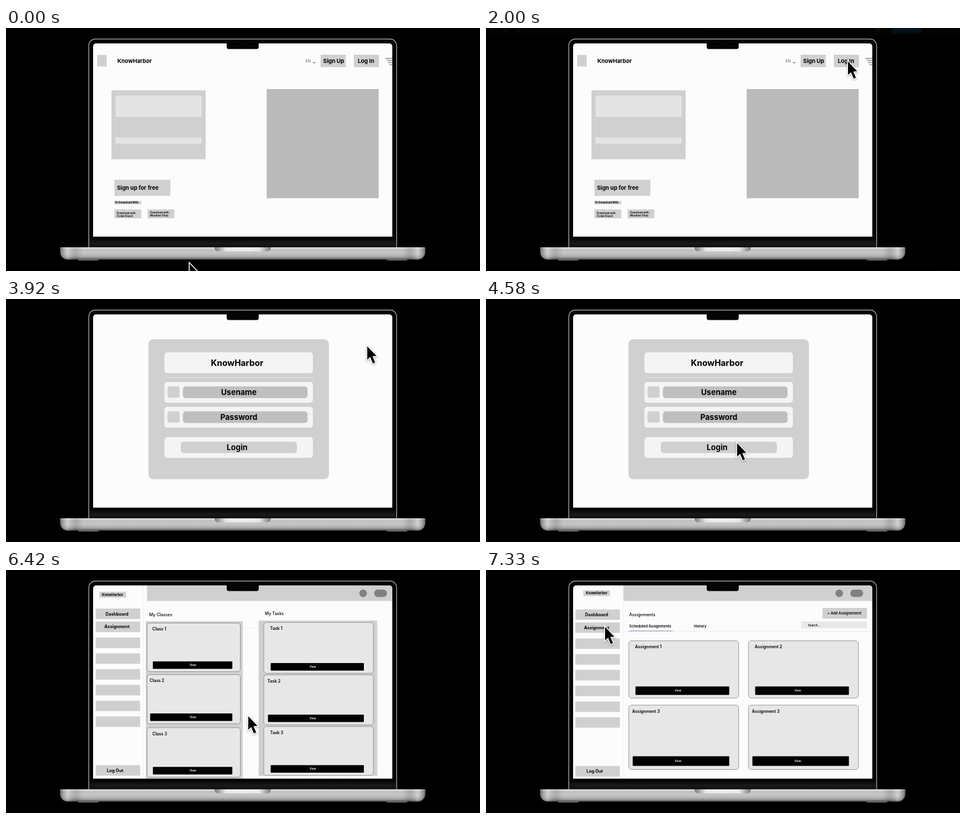
Animation of 800x410 px, one loop 8000 ms. Source, as an HTML page with a canvas:

```html
<!DOCTYPE html>
<html lang="en">
<head>
<meta charset="utf-8">
<title>Laptop prototype walkthrough</title>
<style>
  html, body { margin: 0; width: 100%; height: 100%; overflow: hidden; background: #000; }
  canvas { display: block; width: 800px; height: 410px; }
</style>
</head>
<body>
<canvas id="stage"></canvas>
<script>
const canvas = document.getElementById('stage');
const ctx = canvas.getContext('2d');
const dpr = window.devicePixelRatio || 1;
canvas.width = 800 * dpr;
canvas.height = 410 * dpr;

const LOOP = 8000, FPS = 12, TICKS = LOOP * FPS / 1000;
const BRAND = 'KnowHarbor';
const GREY = '#d0d0d0', PAPER = '#fcfcfc', PALE = '#d8d8d8';
const SCREEN = { x: 147, y: 26, w: 505, h: 326 };

function box(x, y, w, h, fill, r = 0, stroke, width = 1) {
  ctx.beginPath();
  ctx.roundRect(x, y, w, h, r);
  if (fill) { ctx.fillStyle = fill; ctx.fill(); }
  if (stroke) { ctx.strokeStyle = stroke; ctx.lineWidth = width; ctx.stroke(); }
}

function disc(x, y, r, fill) {
  ctx.beginPath();
  ctx.arc(x, y, r, 0, Math.PI * 2);
  ctx.fillStyle = fill;
  ctx.fill();
}

function line(points, color, width = 1) {
  ctx.beginPath();
  points.forEach(([x, y]) => ctx.lineTo(x, y));
  ctx.strokeStyle = color;
  ctx.lineWidth = width;
  ctx.stroke();
}

const rule = (x0, x1, y, color, width) => line([[x0, y], [x1, y]], color, width);

function text(str, x, y, size, weight = 700, color = '#000', align = 'left') {
  ctx.font = `${weight} ${size}px Inter, sans-serif`;
  ctx.fillStyle = color;
  ctx.textAlign = align;
  ctx.fillText(str, x, y);
}

// Text centred on a point, using the cap height.
function label(str, x, y, size, weight, color) {
  text(str, x, y + size * 0.364, size, weight, color, 'center');
}

function chevron(x, y, color, s = 1.5, width = 0.8) {
  line([[x - s, y - s / 2], [x, y + s / 2], [x + s, y - s / 2]], color, width);
}

// Evenly spaced colours along a line.
function gradient(x0, y0, x1, y1, ...colors) {
  const g = ctx.createLinearGradient(x0, y0, x1, y1);
  colors.forEach((c, i) => g.addColorStop(i / (colors.length - 1), c));
  return g;
}

function drawLaptop() {
  box(139.7, 18.7, 519.6, 357, '#030303', [11, 11, 0, 0], '#b4b4b4', 1.2);
  box(141, 357, 517, 13, gradient(0, 357, 0, 370, '#0a0a0a', '#191919', '#101010'));

  for (const x of [121, 642]) box(x, 388, 36, 4.3, '#777', [0, 0, 3, 3]);
  const corners = [1, 1, 13, 13];
  const metal = gradient(0, 370, 0, 391, '#e2e2e2', '#c0c0c0', '#c6c6c6', '#bcbcbc', '#a0a0a0', '#4c4c4c');
  box(91.5, 370, 616, 20.8, metal, corners);
  for (const [edge, inner] of [[91.5, 131], [707.5, 668]]) {
    const shade = gradient(edge, 0, inner, 0, 'rgba(0,0,0,.45)', 'rgba(255,255,255,.2)', 'rgba(0,0,0,.12)', 'rgba(0,0,0,0)');
    box(Math.min(edge, inner), 370, 39.5, 20.8, shade, corners);
  }
  box(352, 370, 95, 6.8, gradient(352, 0, 447, 0, '#777', '#e6e6e6', '#ededed', '#ededed', '#e6e6e6', '#777'), [0, 0, 6, 6]);
}

function drawNotch() {
  box(372.5, 20, 54, 15.5, '#030303', [0, 0, 3.5, 3.5]);
  disc(400, 28, 1.3, '#15151c');
}

function drawHome() {
  box(154, 45.5, 16, 19.5, GREY);
  text(BRAND, 188, 59, 9.4);
  text('EN', 506, 58, 5.8, 400, '#555');
  chevron(520, 58.3, '#222', 2, 1);
  ['Sign Up', 'Log In'].forEach((str, i) => {
    box(531 + 56 * i, 45, 42.5, 21, GREY);
    text(str, 535.3 + 58.5 * i, 58.7, 9.4);
  });
  for (let i = 0; i < 4; i++) rule(640.3 + i * 2.3, 652, 51.3 + i * 3.5, '#777', 1.2);

  box(178, 105, 159, 116.5, GREY);
  box(185, 114, 145, 36, '#e4e4e4');
  box(185, 184.5, 145, 10.5, '#e4e4e4');
  box(440, 103, 189, 184.3, '#bbb');

  box(183, 256, 94.5, 27.3, GREY);
  text('Sign up for free', 187.2, 273.4, 9.4);
  box(183, 291.7, 45.2, 5.8, GREY);
  text('Or Download With:', 184, 296.2, 4.45);
  ['Cedar Depot', 'Meadow Shop'].forEach((store, i) => {
    const x = 187 + 56.2 * i, y = 314 - i;
    box(183 + 56 * i, 306, 45.2, 15, GREY);
    text('Download with', x, y, 4.45, 600);
    text(store, x, y + 4.8, 4.45, 600);
  });
}

function drawLogin() {
  box(240.5, 68, 304.5, 236, GREY, 8);
  const row = y => box(267.3, y, 250.7, 35, '#f4f4f4', 5);
  row(90);
  label(BRAND, 390, 107.8, 14.3);
  rule(267, 518, 132.5, '#e6e6e6');
  ['Usename', 'Password'].forEach((str, i) => {
    const y = 140 + 42 * i;
    row(y);
    box(272.6, y + 7.6, 20.4, 19, GREY, 3);
    box(298.6, y + 7.6, 210.4, 19.6, '#c0bfbf', 5);
    label(str, 393, y + 17.6, 13);
  });
  row(233);
  box(295, 240.8, 196, 19.2, GREY, 5);
  label('Login', 390, 250.5, 13);
}

function drawSidebar(dx, dy) {
  ctx.save();
  ctx.translate(dx, dy);
  const bar = y => box(151.5, y, 74.9, 17.7, GREY);
  ['Dashboard', 'Assignment'].forEach((str, i) => {
    bar(65 + 22 * i);
    label(str, 187.3, 74 + 21.6 * i, 7.25);
  });
  for (let i = 0; i < 6; i++) bar(114 + 26.6 * i);
  bar(329.3);
  label('Log Out', 184, 338.4, 7.25);
  ctx.restore();
}

function drawHeader(left, brandX, brandY, dotX) {
  line([[232, 26], [232, 352]], '#f0f0f0');
  box(left, 26, 652 - left, 26.3, GREY);
  box(brandX, brandY, 45, 9.7, GREY);
  label(BRAND, brandX + 22.5, brandY + 4.9, 5.8);
  disc(dotX, 39.3, 6.4, '#808080');
  box(dotX + 18.7, 33, 21.6, 12.5, '#808080', 6);
}

// A card with its title and a black bar that ends at barEnd.
function panel(title, x, y, w, h, inset, barEnd, barH) {
  box(x, y, w, h, '#e7e7e7', 4.5, '#858585', 0.8);
  text(title, x + inset, y + 12.5, 7, 600);
  const barX = x + inset + 0.9, barY = y + h - barH * 1.37;
  box(barX, barY, x + barEnd - barX, barH, '#000', 1);
  label('View', x + 45 + w * 0.205, barY + barH / 2, 4.6, 600, '#fff');
}

// Three stacked panels; the middle one is inset less.
function column(name, x, w, tops, h, grow, inset, barEnd) {
  tops.forEach((y, i) => panel(`${name} ${i + 1}`, x, y, w, h + grow * i, inset - 4.6 * (i % 2), barEnd, 12.6));
}

function drawDashboard() {
  drawHeader(238, 157.5, 36.8, 602.7);
  drawSidebar(0, 0);
  rule(400, 427, 97.5, '#f0f0f0');
  text('My Classes', 241.8, 78, 7, 500);
  text('My Tasks', 437, 76.3, 7, 500);
  box(236, 86.5, 163.6, 265.5, GREY);
  box(426.3, 85.3, 200.3, 262, GREY);
  column('Class', 238.2, 157.3, [89.5, 176.5, 266], 82, 0.8, 8.8, 143.8);
  column('Task', 435, 185, [88.5, 177, 264], 85.8, -1.6, 10.8, 169);
}

function drawAssignments() {
  drawHeader(232, 164.3, 34.3, 596.2);
  drawSidebar(-0.6, 1.4);
  text('Assignments', 241.8, 78, 7.1, 500);
  box(568, 64, 75, 18, GREY);
  label('+ Add Assignement', 604.8, 73, 6.05, 600);
  box(532, 87, 111, 11.2, '#e8e8e8');
  text('Search...', 543.5, 94.5, 4.8, 600);
  rule(232, 652, 103.5, '#ededed');
  rule(241, 315, 102.8, '#6a70a8', 0.8);
  text('Scheduled Assignments', 241.8, 96.8, 6.05, 600);
  text('History', 351, 96.8, 6, 600);
  for (let i = 0; i < 4; i++) {
    const col = i % 2, row = i >> 1;
    panel(`Assignment ${Math.min(i + 1, 3)}`, 241 + 202 * col, 119.5 + 108.5 * row,
      185.5, 96.5 + 12 * row, 10.4 - 4.7 * row, 169.5, 14.2 + 2 * row);
  }
}

function drawToolbar(alpha) {
  ctx.save();
  ctx.globalAlpha = alpha;
  box(0, 0, 800, 12.5, '#2c2c2c');
  disc(11, 1.5, 3, '#4a7dff');
  box(29.5, -2, 7.5, 7, null, 1, PALE);
  line([[32, -2], [32, 5]], PALE);
  line([[51.5, 0], [51.5, 5], [55.5, 5], [58, 4], [59.3, 1.5], [59, 0]], PALE);
  label('knowharbor login', 396.5, 1.8, 6.5, 400, PALE);
  for (const x of [430, 672, 769.5]) chevron(x, 1.7, '#a0a0a0');
  disc(661, 1.8, 5.6, '#15785f');
  label('W', 661, 2, 5, 500, '#fff');
  box(684, -5, 51, 13.8, '#0d99ff', 3);
  label('Share prototype', 710, 2, 5.4, 500, '#fff');
  text('Options', 746, 4, 5.1, 500, PALE);
  line([[785.5, 2], [785.5, 4.5], [788, 4.5]], PALE);
  line([[788, 2], [791, -1]], PALE);
  line([[396, 408], [394.5, 409.5], [396, 411]], '#888');
  line([[403.5, 407.5], [405.5, 409.5], [403.5, 411.5]], '#eee');
  line([[756.5, 411], [756.5, 409], [760, 409]], PALE);
  text('Restart', 764, 412, 5.2, 500, PALE);
  text('R', 786, 412, 5.2, 400, '#888');
  ctx.restore();
}

function drawCursor(x, y) {
  ctx.save();
  ctx.translate(x, y);
  ctx.beginPath();
  for (const p of [[1, 2], [1, 24.8], [6, 20.2], [10.6, 31], [14.4, 29.4], [9.8, 18.9], [16.6, 18.4]]) ctx.lineTo(...p);
  ctx.closePath();
  ctx.lineWidth = 3;
  ctx.strokeStyle = '#fff';
  ctx.shadowColor = 'rgba(0,0,0,.35)';
  ctx.shadowBlur = 3 * dpr;
  ctx.shadowOffsetY = dpr;
  ctx.stroke();
  ctx.shadowColor = 'transparent';
  ctx.fillStyle = '#000';
  ctx.fill();
  ctx.restore();
}

// Larger a: slower start; larger b: softer stop.
const ease = (a, b) => u => 1 - (1 - u ** a) ** b;
const soft = ease(1.8, 2), slow = ease(3, 3), settle = ease(1, 1.5);

const START = { x: 309, y: 395.5 };
const MOVES = [
  { from: 11, to: 15, x: 610, y: 84, easeX: soft },
  { from: 17, to: 22, x: 610, y: 54.5, easeX: soft },
  { from: 46, to: 56, x: 415, y: 243.8, easeX: ease(2.5, 2.2), easeY: ease(1.2, 2) },
  { from: 56, to: 59, x: 408.7, y: 245.3, easeX: settle },
  { from: 76, to: 85, x: 200, y: 94, easeX: slow }
];

function cursorAt(tick) {
  let { x, y } = START;
  for (const m of MOVES) {
    if (tick <= m.from) break;
    const u = Math.min(1, (tick - m.from) / (m.to - m.from));
    x += (m.x - x) * m.easeX(u);
    y += (m.y - y) * (m.easeY || m.easeX)(u);
  }
  return [x, y];
}

// The toolbar flashes twice: four ticks in, three out.
function toolbarAlpha(tick) {
  const flash = start => Math.min((tick - start + 1) / 4, (start + 6 - tick) / 3);
  return Math.max(0, flash(24), flash(32)) ** 1.8;
}

function sceneAt(tick) {
  if (tick < 36) return drawHome;
  if (tick < 61) return drawLogin;
  if (tick < 88) return drawDashboard;
  return drawAssignments;
}

function render(ms) {
  const tick = Math.floor((ms % LOOP + 4) * FPS / 1000) % TICKS;
  ctx.setTransform(dpr, 0, 0, dpr, 0, 0);
  box(0, 0, 800, 410, '#000');

  const alpha = toolbarAlpha(tick);
  if (alpha > 0) drawToolbar(alpha);
  drawLaptop();

  ctx.save();
  box(SCREEN.x, SCREEN.y, SCREEN.w, SCREEN.h, PAPER, [5, 5, 0, 0]);
  ctx.clip();
  sceneAt(tick)();
  ctx.restore();

  drawNotch();
  drawCursor(...cursorAt(tick));
}

let origin;
function loop(now) {
  origin ??= now;
  render(Math.max(0, now - origin));
  requestAnimationFrame(loop);
}
render(0);
requestAnimationFrame(loop);
</script>
</body>
</html>
```
